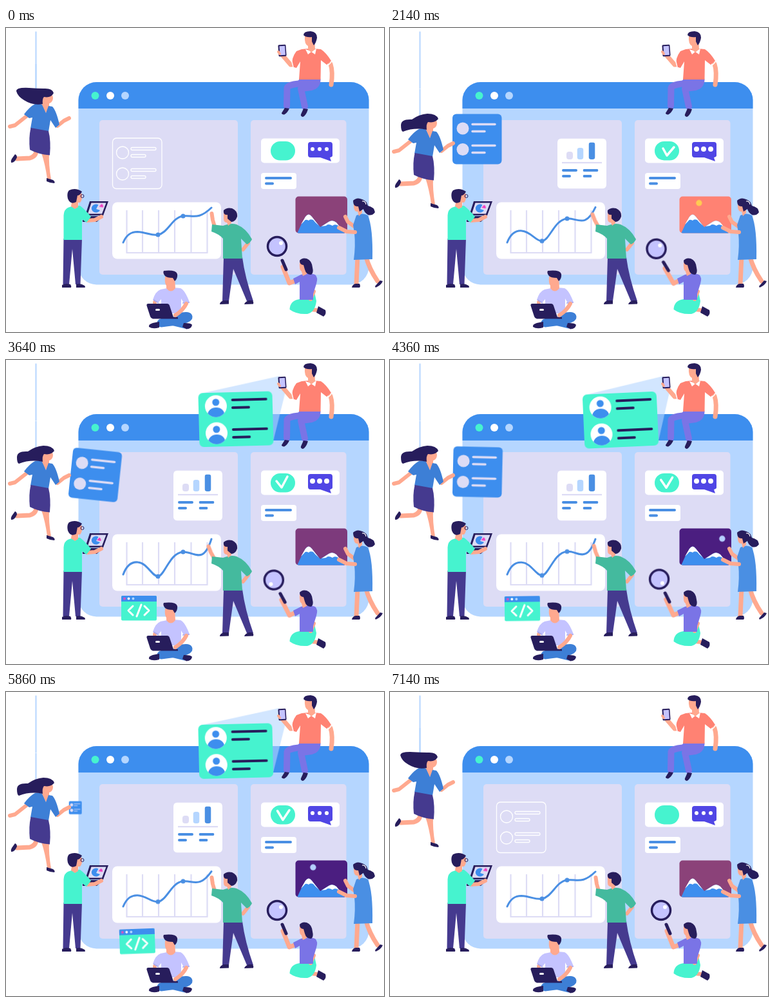
Recreate the animation shown at these times as an HTML page. Size 587 by 472 pixels, loop 7210 ms.

```html
<!DOCTYPE html>
<html lang="en">
<head>
<meta charset="utf-8">
<title>Team building a web page</title>
<style>
  :root {
    --skin: #ffa98f; --navy: #271d5c; --mint: #46f3cf; --blue: #3d8eee; --mid: #4a8fe3;
    --denim: #3d7fd6; --sky: #b5d6ff; --lav: #dddcf5; --pants: #453a8f; --violet: #7a74e6;
    --coral: #ff8273; --lilac: #c4c3ff; --green: #44ba9e;
    --T: 7210ms; --soft: cubic-bezier(.37, 0, .63, 1);
  }
  html, body { margin: 0; width: 100%; height: 100%; overflow: hidden; background: #fff; }
  svg { display: block; width: 100%; height: 100%; }

  .skin { fill: var(--skin) } .navy { fill: var(--navy) } .mint { fill: var(--mint) }
  .blue { fill: var(--blue) } .mid { fill: var(--mid) } .sky { fill: var(--sky) }
  .denim { fill: var(--denim) }
  .lav { fill: var(--lav) } .pants { fill: var(--pants) } .violet { fill: var(--violet) }
  .coral { fill: var(--coral) } .lilac { fill: var(--lilac) } .green { fill: var(--green) }
  .white { fill: #fff }
  .line { fill: none; stroke-linecap: round; stroke-linejoin: round; stroke: #fff; stroke-width: 3.5 }
  .limb { fill: none; stroke-linecap: round; stroke-linejoin: round; stroke: var(--skin); stroke-width: 7 }

  .anim, .ghost > *, .wipe > * { animation: var(--T) var(--soft) infinite; }

  .flyer { animation-name: fly }
  @keyframes fly {
    0%, 2.8% { transform: none }
    15.3%, 82.5% { transform: translateY(39px) }
    95.3%, 100% { transform: none }
  }
  .hair { animation-name: hair }
  @keyframes hair {
    0%, 100% { d: path("M74 101Q72 93 58 94Q48 94 36 93Q16 92 16 98Q18 106 28 112Q42 121 57 118Q56 110 59 107Q70 109 74 101Z") }
    11% { d: path("M74 100Q72 93 58 96Q45 95 34 86Q18 77 16 88Q18 99 27 107Q40 119 57 116Q56 110 59 107Q70 109 74 100Z") }
    19%, 82.5% { d: path("M75 102Q72 94 58 94Q45 95 34 103Q17 102 17 112Q17 121 20 122Q38 115 57 119Q56 110 59 107Q70 109 75 102Z") }
    89.2% { d: path("M74 102Q70 93 58 94Q46 95 36 104Q22 107 23 119Q20 127 24 129Q44 124 57 117Q56 110 59 107Q70 109 74 102Z") }
  }

  .profile { animation-name: profile; transform-origin: 98px 182px }
  @keyframes profile {
    0%, 15.8% { transform: scale(0) }
    21.5%, 36% { transform: none }
    50.5% { transform: translate(2.5px, 2px) rotate(6deg) }
    65%, 78% { transform: none }
    83%, 100% { transform: scale(0) }
  }

  .ghost > * { fill: none; stroke: #fff; stroke-width: 1.3; animation-name: trim }
  @keyframes trim {
    0%, 4% { stroke-dasharray: 100 100; stroke-dashoffset: 0 }
    11% { stroke-dasharray: 27 100; stroke-dashoffset: -26 }
    15%, 85% { stroke-dasharray: 0 100; stroke-dashoffset: -45 }
    89.2% { stroke-dasharray: 35 100; stroke-dashoffset: -18 }
    95%, 100% { stroke-dasharray: 100 100; stroke-dashoffset: 0 }
  }
  .wipe > * { animation-name: wipe }
  @keyframes wipe {
    0%, 4% { clip-path: polygon(100% 0, 100% 0, 100% 100%, 100% 100%) }
    11% { clip-path: polygon(9% 0, 100% 0, 100% 100%, 90% 100%) }
    16%, 84% { clip-path: polygon(0 0, 100% 0, 100% 100%, 0 100%) }
    89.2% { clip-path: polygon(32% 0, 100% 0, 100% 100%, 92% 100%) }
    95%, 100% { clip-path: polygon(100% 0, 100% 0, 100% 100%, 100% 100%) }
  }

  .check { stroke-dasharray: 1 2; animation-name: check }
  @keyframes check {
    0%, 2% { stroke-dashoffset: 1.2; d: path("M421.5 184.5L430 198.5L440 183.5") }
    10% { stroke-dashoffset: 0; d: path("M421.5 184.5L430 198.5L440 183.5") }
    29.7% { stroke-dashoffset: 0; d: path("M424 187L430 198L441 185") }
    50.5% { stroke-dashoffset: 0; d: path("M420 188L428 198L437 181") }
    70%, 91% { stroke-dashoffset: 0; d: path("M421.5 184.5L430 198.5L440 183.5") }
    97%, 100% { stroke-dashoffset: 1.2; d: path("M421.5 184.5L430 198.5L440 183.5") }
  }
  .typing circle { animation: dot var(--T) var(--soft) infinite }
  @keyframes dot { 0%, 3%, 86%, 100% { r: 3px } 11%, 60% { r: 4px } }

  .curve { animation-name: curve }
  @keyframes curve {
    0%, 100% { d: path("M182 333C188 319 196 316.5 204 316.5C218 317 226 323 236 321C252 318 258 294 275 292C290 290 298 299 319 279") }
    50% { d: path("M182 333C188 317 196 313 205 314C219 315 227 336 236 336C246 336 254 299 275 298C292 297 306 319 319 278") }
  }
  .low { animation-name: low } .high { animation-name: high }
  @keyframes low { 50% { transform: translateY(15px) } }
  @keyframes high { 50% { transform: translateY(6px) } }
  .point { animation-name: point; transform-origin: 323px 311px }
  @keyframes point { 0%, 13%, 70%, 100% { transform: none } 28%, 52% { transform: rotate(-13deg) } }

  .skyline { animation-name: dusk }
  @keyframes dusk {
    0%, 100% { fill: #8b4279 }
    10%, 38% { fill: #ff8273 }
    50.5% { fill: #7d3a7c }
    58%, 82% { fill: #4b1e80 }
    89.2% { fill: #7d3c80 }
  }
  .cross { animation: cross 3605ms linear infinite }
  @keyframes cross { from { transform: translateX(535.5px) } to { transform: translateX(441.8px) } }
  .arc { animation: arc 3605ms infinite, light var(--T) steps(1) infinite }
  @keyframes arc {
    0%, 100% { transform: translateY(290px); animation-timing-function: cubic-bezier(.333, .667, .667, 1) }
    50% { transform: translateY(271px); animation-timing-function: cubic-bezier(.333, 0, .667, .333) }
  }
  @keyframes light { 0%, 100% { fill: #ffcb52 } 50% { fill: #b5d0ff } }

  .search { animation-name: search; transform-origin: 445px 394px }
  @keyframes search {
    0%, 2%, 72%, 100% { transform: none }
    11% { transform: rotate(-4deg) }
    29.7% { transform: rotate(-8deg) }
    50.5% { transform: rotate(-5.5deg) }
  }
  .glint { animation-name: glint; transform-origin: 421px 339px }
  @keyframes glint {
    0%, 72%, 100% { transform: none }
    11% { transform: rotate(-105deg) }
    29.7% { transform: rotate(5deg) }
    50.5% { transform: rotate(170deg) }
  }
  .slice { animation-name: slice }
  @keyframes slice { 0%, 100% { transform: translate(3.5px, -2.5px) } 50% { transform: none } }

  .code { animation-name: code; transform-origin: 256px 463px }
  @keyframes code {
    0%, 34% { transform: scale(.3); opacity: 0 }
    42%, 52% { transform: none; opacity: 1 }
    72.3%, 82% { transform: rotate(-2deg); opacity: 1 }
    89.2% { transform: scale(.49); opacity: .25 }
    91%, 100% { transform: scale(.3); opacity: 0 }
  }
  .contacts { animation-name: contacts; transform-origin: 428px 35px }
  @keyframes contacts {
    0%, 34% { transform: scale(0) }
    42% { transform: none }
    50.5% { transform: rotate(-1.5deg) }
    72.3% { transform: rotate(-4deg) }
    87%, 92% { transform: none }
    99%, 100% { transform: scale(0) }
  }
</style>
</head>
<body>
<svg viewBox="0 0 587 472">
  <defs>
    <clipPath id="frame"><rect x="449.5" y="261.5" width="80.5" height="57" rx="5"/></clipPath>
    <clipPath id="avatar"><circle r="17"/></clipPath>
    <g id="person">
      <circle r="17" class="white"/>
      <circle cy="-6" r="5.5" class="blue"/>
      <ellipse cy="13" rx="13" ry="11" class="blue" clip-path="url(#avatar)"/>
    </g>
  </defs>

  <!-- browser window -->
  <rect x="112.5" y="84" width="451" height="314.5" rx="28" class="sky"/>
  <path class="blue" d="M112.5 125V112A28 28 0 0 1 140.5 84H535.5A28 28 0 0 1 563.5 112V125Z"/>
  <circle cx="138.5" cy="105" r="6" class="mint"/>
  <circle cx="162" cy="105" r="6" class="white"/>
  <circle cx="185" cy="105" r="6" class="sky"/>
  <rect x="145" y="143" width="215" height="240" rx="5" class="lav"/>
  <rect x="380" y="143" width="148.5" height="240" rx="5" class="lav"/>

  <g class="ghost">
    <rect x="165.5" y="171" width="76.5" height="78.5" rx="6" pathLength="100"/>
    <path pathLength="100" d="M171.5 193.5a9.500 9.500 0 0 1 19 0a9.500 9.500 0 0 1-19 0"/>
    <path pathLength="100" d="M171.5 226.5a9.500 9.500 0 0 1 19 0a9.500 9.500 0 0 1-19 0"/>
    <rect x="194" y="185.5" width="39" height="4" rx="2" pathLength="100"/>
    <rect x="194" y="196.5" width="23" height="4" rx="2" pathLength="100"/>
    <rect x="194" y="218.5" width="39" height="4" rx="2" pathLength="100"/>
    <rect x="194" y="229.5" width="23" height="4" rx="2" pathLength="100"/>
  </g>

  <g class="wipe">
    <rect x="260" y="171.5" width="76" height="78" rx="6" class="white"/>
    <rect x="274" y="192" width="10" height="12" rx="4" class="lav"/>
    <rect x="290.5" y="186" width="10" height="18" rx="4" class="sky"/>
    <rect x="308.5" y="177.5" width="10" height="26.5" rx="4" class="mid"/>
    <rect x="267" y="208" width="62" height="2.5" class="lav"/>
    <rect x="267" y="219" width="24" height="4" rx="2" class="mid"/>
    <rect x="299.5" y="219" width="24" height="4" rx="2" class="mid"/>
    <rect x="267" y="228" width="14" height="4" rx="2" class="mid"/>
    <rect x="299.5" y="228" width="14" height="4" rx="2" class="mid"/>
  </g>

  <!-- chart -->
  <rect x="165" y="270.5" width="169" height="88" rx="8" class="white"/>
  <path d="M187.5 283V349M212 283V349M237 283V349M262 283V349M287.5 283V349M312.5 283V349M186.5 349H313.5" fill="none" stroke="#dddcf5" stroke-width="2.2"/>
  <path class="line anim curve" style="stroke:var(--mid);stroke-width:3" d="M182 333C188 319 196 316.5 204 316.5C218 317 226 323 236 321C252 318 258 294 275 292C290 290 298 299 319 279"/>
  <circle cx="236" cy="321" r="3.5" class="mid anim low"/>
  <circle cx="275" cy="292" r="3.5" class="mid anim high"/>

  <!-- messages -->
  <rect x="396" y="171.5" width="122" height="38" rx="5" class="white"/>
  <rect x="411" y="176" width="38" height="29.5" rx="14.7" class="mint"/>
  <path class="line anim check" pathLength="1" d="M421.5 184.5L430 198.5L440 183.5"/>
  <path fill="#5046e5" d="M473 177H503Q507 177 507 181V198Q507 200 503 201L505 207L488 201H473Q469 201 469 197V181Q469 177 473 177Z"/>
  <g class="typing white"><circle cx="476" cy="188" r="3"/><circle cx="487" cy="188" r="3"/><circle cx="498" cy="188" r="3"/></g>
  <rect x="396" y="225" width="55" height="25" rx="4" class="white"/>
  <path class="line" style="stroke:var(--mid);stroke-width:4" d="M404 233H442M404 241.5H414"/>

  <!-- picture -->
  <g clip-path="url(#frame)">
    <rect x="449" y="261" width="82" height="58" fill="#8b4279" class="anim skyline"/>
    <g class="cross"><circle r="4.7" class="arc"/></g>
    <path class="blue" d="M452 319Q458 305 465 293Q470 286 475 293L488 309L501 301Q507 297 513 302L526 319Z"/>
    <path class="white" d="M458 305L465 293Q470 286 475 293L486 307Q480 302 477 298Q472 296 470 299Q465 296 463 300ZM490 308L501 301Q507 297 513 302L518 308Q511 303 507 307Q500 303 497 307Z"/>
  </g>

  <!-- projected contacts -->
  <g class="anim contacts">
    <path class="sky" opacity=".6" d="M303 48.5L424 25L435 44L412 128Z"/>
    <rect x="298" y="48" width="115" height="84" rx="7" class="mint"/>
    <use href="#person" x="325" y="69"/>
    <use href="#person" x="325" y="111"/>
    <path class="line" style="stroke:var(--navy);stroke-width:4" d="M351 60H403M351 72H376M351 106H403M351 118H376"/>
  </g>

  <!-- flying woman -->
  <g class="anim profile">
    <rect x="97" y="133.5" width="76.5" height="78" rx="6" class="blue"/>
    <circle cx="113" cy="156" r="9.5" class="lav"/>
    <circle cx="113" cy="188.5" r="9.5" class="lav"/>
    <path class="line" style="stroke:var(--lav)" d="M128 149.5H163M128 160.5H147M128 182.5H163M128 193.5H147"/>
  </g>
  <rect x="45.5" y="5.5" width="2" height="89" class="sky"/>
  <g class="anim flyer">
    <rect x="45.5" y="56" width="2" height="42" class="sky"/>
    <path class="limb" style="stroke-width:6" d="M33 136L14 151L6 153M80 152L90 144L98 140"/>
    <path class="limb" d="M47 190Q47 199 37 202L17 203"/>
    <path class="skin" d="M55 194H67Q66 212 70 235L64 234Q61 212 55 194Z"/>
    <path class="navy" d="M14 196Q17 197 17 201Q13 210 8 209Q7 206 9 203ZM63 233L73 236Q77 239 75 241Q69 241 63 238Z"/>
    <path class="skin" d="M57 110H67V123L62 132L55 119Z"/>
    <path class="denim" d="M45 118Q52 116 56 119L62 132L66 121L72 122Q78 128 83 150L77 155L69 143L66 161L38 156L41 139L36 140L28 134Q37 122 45 118Z"/>
    <path class="pants" d="M38.5 155L66 160Q70 175 68 197.5Q50 196 37 189Q35 170 38.5 155Z"/>
    <ellipse cx="65" cy="109" rx="8" ry="8.5" class="skin"/>
    <path class="navy anim hair" d="M74 101Q72 93 58 94Q48 94 36 93Q16 92 16 98Q18 106 28 112Q42 121 57 118Q56 110 59 107Q70 109 74 101Z"/>
  </g>

  <!-- man with phone -->
  <path class="limb" d="M448 56L442 57L430 43M504 56Q508 68 505 88"/>
  <g transform="rotate(-4 429 35)">
    <rect x="423" y="26" width="12" height="18" rx="1.5" class="navy"/>
    <rect x="425" y="28" width="8.5" height="14" class="lilac"/>
  </g>
  <path class="limb" style="stroke-width:4" d="M423 37L425 40"/>
  <path class="limb" style="stroke:var(--violet);stroke-width:10" d="M480 86Q458 90 458 94L464 122M476 85Q438 86 436.5 93L436 121"/>
  <path class="violet" d="M456 79H488.5Q489 93 475 97L460 99L450 86Z"/>
  <path class="navy" d="M433 124L440 125Q437 132 432 134.5Q428 134 428 132ZM462 125L469 126Q466 136 461 138Q457 137 458 134Z"/>
  <path class="coral" d="M459 33Q474 31 489 33Q497 38 505 51L498 57L489 50L488.5 80H455L457 52L451 62L444 60Q443 46 451 36Z"/>
  <path d="M443 48L446 61M498 60L505 53" stroke="#fff" stroke-width="1.5"/>
  <path class="white" d="M465 33L474 36L482 32L480 41L474 37L469 41Z"/>
  <path class="skin" d="M464 13Q470 8 479 13L480 33L474 38L469 33V28Q463 25 464 13Z"/>
  <path class="navy" d="M462 11Q462 5 473 5Q483 6 483 15Q482 22 478 27L475 21V14Q466 15 462 11Z"/>

  <!-- man presenting a laptop -->
  <path class="pants" d="M89.5 327H118L115.5 398H108L103 343L98 398H88.5Z"/>
  <path class="navy" d="M87 403V399Q92 396 100 398Q102 401 101 403ZM109 403V398Q116 396 122 400Q124 403 122 403Z"/>
  <path class="navy" d="M130 269H159L151 291H123ZM119 292H151L141 301H119Z"/>
  <path class="lav" d="M132.5 271.5H155.5L149 288.5H127Z"/>
  <path class="blue" d="M140 281L143.5 274.5A7 6.500 0 1 0 146 283Z"/>
  <path class="anim slice" fill="#f13fc0" d="M141 280L145 275.5Q148 277 147.5 281Z"/>
  <path class="limb" style="stroke-width:6" d="M126 299L138 298L148 293"/>
  <path class="mint" d="M96 279Q107 275 115 276Q122 281 132 293L125 302L118 297V329H89.5V291Q90 282 96 279Z"/>
  <path class="skin" d="M103 265H112V278L107 281L101 277ZM108 257H118Q119 267 115 271H108Z"/>
  <path class="navy" d="M98 252Q108 247 118 254Q115 260 111 260L109 270Q100 275 96 265Q94 256 98 252Z"/>
  <circle cx="118.5" cy="261" r="2.5" fill="none" stroke="#271d5c" stroke-width="1"/>

  <!-- man coding -->
  <g class="anim code">
    <rect x="179" y="366" width="55" height="38.5" rx="2" class="mint"/>
    <path class="blue" d="M179 375V368Q179 366 181 366H232Q234 366 234 368V375Z"/>
    <circle cx="184" cy="370.5" r="1.9" fill="#d94fc0"/><circle cx="190.5" cy="370.5" r="1.9" class="white"/><circle cx="197.5" cy="370.5" r="1.9" class="sky"/>
    <path class="line" style="stroke-width:3" d="M197 382L190 389L197 396M210 380L203 398M215 382L222 389L215 396"/>
  </g>
  <path class="limb" style="stroke:var(--denim);stroke-width:13" d="M267 449Q284 446 283 449Q280 454 241 458"/>
  <path class="limb" style="stroke:var(--denim);stroke-width:9" d="M244 454L277 462"/>
  <path class="navy" d="M238 456V465Q228 468 222 464Q221 460 228 458ZM276 458Q288 458 289 461Q288 467 280 467.5L274 464Z"/>
  <path class="limb" style="stroke-width:6" d="M234 420L231 426M281 425Q276 438 264 445"/>
  <path class="lilac" d="M240 406Q255 402 271 404Q278 407 285 426L277 429L272 420V443H241V421L236 427L228 422Q232 409 240 406Z"/>
  <path d="M274 427L285 426M229 422L237 427" stroke="#aaa9ef" stroke-width="1.5"/>
  <path class="navy" d="M221 428H250Q253 428 254 431L260 449H267V451.5H228Q225 451 224 448L218.5 431Q218 428 221 428Z"/>
  <rect x="232" y="436" width="7" height="3" rx="1.5" class="white"/>
  <path class="limb" style="stroke-width:6" d="M280 428Q275 438 263 446"/>
  <path class="skin" d="M247 386H262L263 404Q256 413 249 404V400Q246 396 247 386Z"/>
  <path class="navy" d="M245 377Q264 375 266 382Q267 389 262 393L259 388Q250 388 247 385Q243 380 245 377Z"/>

  <!-- man at the chart -->
  <path class="pants" d="M338 356H367Q371 387 384 424H374L353 374L346 424H336Z"/>
  <path class="navy" d="M332 429Q332 425 338 423H346V428.5ZM370 429Q371 425 377 423H383Q385 426 384 428.5Z"/>
  <path class="limb" style="stroke-width:6" d="M376 334L368 344"/>
  <g class="anim point"><path class="limb" style="stroke-width:6" d="M325 312L321 298L319.5 288"/></g>
  <path class="green" d="M337 307Q350 302 358 305Q373 311 382 328Q380 333 374 336L365 327L367 358H337V327Q331 320 319 316L320 305Z"/>
  <path class="skin" d="M338 286H350V303L345 307L343 302Q338 302 338 296Z"/>
  <path class="navy" d="M338 283Q343 278 351 280Q360 284 359 293Q356 301 350 301L344 296V290Q337 291 338 283Z"/>

  <!-- woman with magnifier -->
  <g class="anim search">
    <path class="limb" style="stroke-width:7" d="M448 393L440 396L430 371"/>
    <path class="limb" style="stroke:var(--navy);stroke-width:5" d="M429 361L435 375"/>
    <circle cx="421" cy="339" r="14.5" class="lilac" stroke="#271d5c" stroke-width="3.5"/>
    <circle cx="427" cy="334" r="3" class="white anim glint"/>
  </g>
  <path class="limb" style="stroke-width:6" d="M472 437L483 438"/>
  <path class="navy" d="M485 432L496 438Q498 444 493 448L482 442Z"/>
  <path class="mint" d="M456 421Q441 423 440.5 437Q451 445 468 444Q480 441 482 424L479 410Z"/>
  <path class="limb" style="stroke-width:6" d="M478 409L473 421"/>
  <path class="violet" d="M458 383Q470 379 480 383Q485 387 482 397L477 413V422H456V394L449 398L446 389Z"/>
  <path class="skin" d="M456 364H467V382L461 385L459 378Q455 376 456 364Z"/>
  <path class="navy" d="M456 361Q460 356 467 358Q475 361 476 372Q478 380 474 383Q466 383 464 375L462 368Q456 368 456 361Z"/>

  <!-- woman holding the picture -->
  <path class="limb" style="stroke-width:7" d="M546 355L544 398M559 355Q564 374 577 393"/>
  <path class="navy" d="M537 403Q538 398 543 397H549Q551 401 549 403ZM573 401L581 392L585 393Q583 399 574 403Z"/>
  <path class="limb" style="stroke-width:6" d="M542 309L531 301L527 293"/>
  <path class="mid" d="M544 291Q554 286 562 291Q570 310 569 359L540 360Q543 338 541 318L539 306Z"/>
  <path class="limb" style="stroke-width:6" d="M542 317L529 316L517 310"/>
  <path class="skin" d="M540 271H553V287L548 292L546 285Q539 286 540 271Z"/>
  <path class="navy" d="M539 268Q545 262 553 266Q560 268 562 276Q572 278 573 286Q569 292 562 290Q556 286 555 281L549 285L547 277Q539 278 539 268Z"/>
  <path d="M553 269Q558 268 559 274" fill="none" stroke="#fff" stroke-width="1.2"/>
</svg>
</body>
</html>
```
